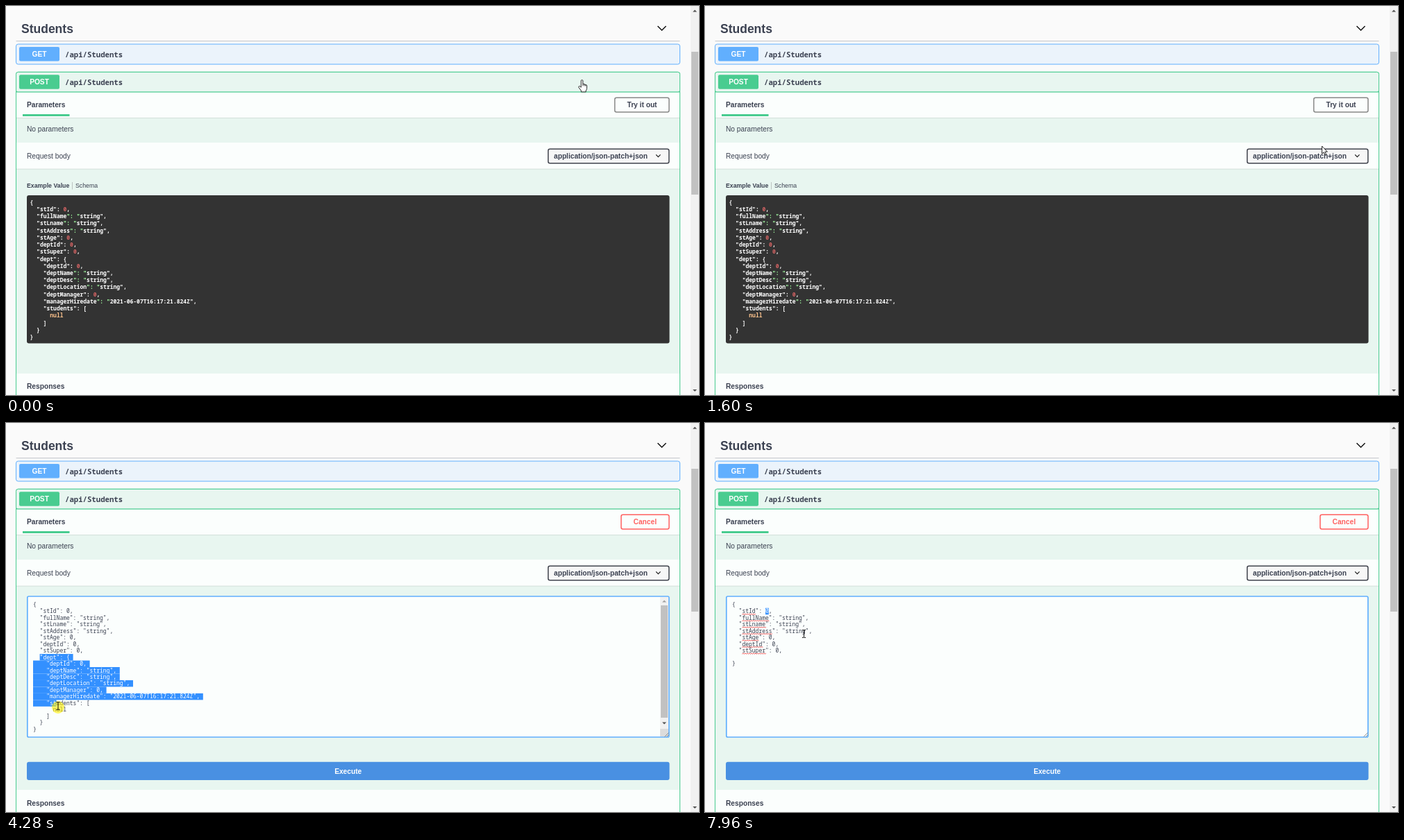
Recreate the animation shown at these times as an HTML page. Size 998 by 561 pixels, loop 8 s.

```html
<!DOCTYPE html>
<html lang="en">
<head>
<meta charset="utf-8">
<title>API docs walkthrough</title>
<style>
  html, body { margin: 0; width: 100%; height: 100%; overflow: hidden; background: #fafafa; }
  svg { display: block; width: 100vw; height: 100vh; }
  text { font-family: "Liberation Sans", Arial, sans-serif; font-size: 10.2px; fill: #3b4151; white-space: pre; }
  .b { font-weight: 700; }
  .mono { font-family: "Noto Sans Mono", "DejaVu Sans Mono", monospace; font-size: 8px; }
  .path { font-size: 10.67px; font-weight: 700; }
  .code { font-weight: 700; fill: #fff; }
  .area { font-weight: 500; }
</style>
</head>
<body>
<svg id="stage" viewBox="0 0 998 561" preserveAspectRatio="none"></svg>
<script>
const LOOP = 8000, ROW = 9.47, COL = 4.8;
const T = { collapse: 80, expand: 1600, edit: 2320, focus: 3440, release: 4900, remove: 5800, pick: 6920, pickEnd: 7240, spell: 7480 };
const INK = '#3b4151', BLUE = '#61affe', GREEN = '#49cc90', TINT = '#e8f6f0', PALE = '#fbfefd';

const rect = (x, y, w, h, fill, extra = '') =>
  `<rect x="${x}" y="${y}" width="${w}" height="${h}" fill="${fill}" ${extra}/>`;
const text = (x, y, s, cls = '', extra = '') => `<text x="${x}" y="${y}" class="${cls}" ${extra}>${s}</text>`;
const line = (d, color, w = 1, extra = '') => `<path d="${d}" fill="none" stroke="${color}" stroke-width="${w}" ${extra}/>`;
const group = (id, body) => `<g id="${id}">${body}</g>`;
const chevron = (x, y, r, w, color = '#111') => line(`M${x - r} ${y - r / 2}l${r} ${r}l${r} ${-r}`, color, w);
const triangle = (x, y, dir, color) => `<path d="M${x - 3} ${y + 1.5 * dir}h6l-3 ${-3 * dir}z" fill="${color}"/>`;
const size = n => `style="font-size:${n}px"`;

const body = [
  '{', '  "stId": 0,', '  "fullName": "string",', '  "stLname": "string",', '  "stAddress": "string",',
  '  "stAge": 0,', '  "deptId": 0,', '  "stSuper": 0,', '  "dept": {', '    "deptId": 0,',
  '    "deptName": "string",', '    "deptDesc": "string",', '    "deptLocation": "string",',
  '    "deptManager": 0,', '    "managerHiredate": "2021-06-07T16:17:21.824Z",', '    "students": [',
  '      null', '    ]', '  }', '}'
];
const trimmed = [...body.slice(0, 8), '  ', '}'];

function operation(y, verb, path, color, tint) {
  const w = verb === 'DELETE' ? 62 : 58;
  return rect(14.5, y, 956, 29, tint, `stroke="${color}" rx="3"`) +
    rect(19, y + 4, w, 20.5, color, 'rx="2"') +
    text(19 + w / 2, y + 18, verb, 'b', 'text-anchor="middle" style="fill:#fff"') +
    text(w + 27, y + 18.5, path, 'mono path');
}
const tagHeader = y => text(22, y + 6, 'Students', 'b', size(17.5)) +
  chevron(944.5, y - .8, 6, 1.5) + line(`M14.5 ${y + 17.8}H970.5`, '#c3c5ca');

function pageScrollbar(y, h, endColor) {
  return rect(986, 0, 12, 561, '#f1f1f1') + rect(987, y, 10, h, '#c1c1c1') +
    triangle(992, 7, 1, '#505050') + triangle(992, 554.5, -1, endColor);
}

function collapsedPage() {
  const pill = (x, w, s, color) => rect(x, 36, w, 14.5, color, 'rx="7.2"') +
    text(x + w / 2, 46.9, s, 'b', 'text-anchor="middle" style="fill:#fff"');
  const model = (y, s, x) => rect(30, y, 925.5, 42, '#ededed', 'rx="3"') +
    text(44.5, y + 24.5, s, 'b', size(11.7)) + line(`M${x} ${y + 18.5}l3.5 3.3l-3.5 3.3`, '#111', 1.5);
  return text(14.5, 60, 'API_Core', 'b', size(26)) +
    pill(137, 22, 'v1', '#7d8492') + pill(163, 34.5, 'OAS3', '#89bf04') +
    text(14.5, 76.5, '/swagger/v1/swagger.json', '', 'style="font-size:8.75px;fill:#4990e2"') +
    tagHeader(134.2) +
    operation(156.5, 'GET', '/api/Students', BLUE, '#ebf3fb') +
    operation(196.7, 'POST', '/api/Students', GREEN, TINT) +
    operation(237, 'GET', '/api/Students/{StId}', BLUE, '#ebf3fb') +
    operation(277.2, 'PUT', '/api/Students/{StId}', '#fca130', '#fbf1e6') +
    operation(317.4, 'DELETE', '/api/Students/{StId}', '#f93e3e', '#fbe7e7') +
    rect(14.5, 379.5, 956, 159, 'none', 'stroke="#c3c5ca" rx="3"') +
    text(23, 398.3, 'Schemas', 'b', 'style="font-size:11.7px;fill:#5a5e68"') +
    chevron(948, 394.5, 6, 1.5) + line('M14.5 409.5H970.5', '#c3c5ca') +
    model(424.8, 'Department', 124.5) + model(481.5, 'Student', 103.5) +
    pageScrollbar(51.5, 497, '#a0a0a0') +
    rect(167, 204, 1, 15, INK, 'id="pathCaret"') + rect(62, 205, 1, 12, '#fff', 'id="verbCaret"');
}

function colored(s) {
  return s.replace(/("[^"]*")(?!:)|\b0\b(?=,)|null/g, (m, str) => {
    const color = str ? '#a2fca2' : m === 'null' ? '#fcc28c' : '#d36363';
    return m.startsWith('"') && !str ? m : `<tspan fill="${color}">${m}</tspan>`;
  });
}

function expandedPage() {
  const shade = y => rect(15, y, 955, 1, '#000', 'opacity=".09"');
  const example = text(30, 262, 'Example Value', 'b', size(8.75)) + line('M95.5 254V264.5', '#bbc3c1') +
    text(100, 262, 'Schema', '', size(8.75)) + rect(30, 273, 925.5, 213.5, '#333', 'rx="3"') +
    body.map((s, i) => text(34.5, 285.8 + i * 10.22, colored(s), 'mono code')).join('') +
    rect(876.7, 132.2, 78.2, 20.8, 'none', 'stroke="#888" stroke-width="1.5" rx="2.5"') +
    text(916, 146, 'Try it out', 'b', 'text-anchor="middle"') +
    rect(15, 530, 955, 31, PALE) + text(30, 552.2, 'Responses', 'b');
  const edit = rect(885.9, 132.2, 69, 20.8, 'none', 'id="cancelBox" stroke-width="1.5" rx="2.5"') +
    text(920.3, 146, 'Cancel', 'b', 'id="cancelText" text-anchor="middle"') + group('editor', '') +
    rect(30, 488.7, 925.5, 26.3, '#4990e2', 'rx="3"') +
    text(492.7, 505.6, 'Execute', 'b', 'text-anchor="middle" style="fill:#fff"') +
    rect(15, 529, 955, 32, PALE) + text(30, 551.6, 'Responses', 'b');
  return tagHeader(32.8) + operation(55, 'GET', '/api/Students', BLUE, '#ebf3fb') +
    rect(14.5, 95.3, 956, 480, TINT, `stroke="${GREEN}" rx="3"`) +
    operation(95.3, 'POST', '/api/Students', GREEN, TINT) +
    rect(15, 124.3, 955, 36.7, PALE) + rect(15, 123.5, 955, 1, GREEN) + shade(161) +
    text(30, 146, 'Parameters', 'b') + rect(24, 156, 67.5, 3, GREEN) +
    text(30, 181.3, 'No parameters') +
    rect(15, 197, 955, 37.7, PALE) + shade(234.7) + text(30, 219.8, 'Request body') +
    rect(780.8, 206.2, 174, 20.6, '#f7f7f7', 'stroke="#41444e" stroke-width="1.5" rx="2.5"') +
    text(789, 220, 'application/json-patch+json', 'b') + chevron(939.3, 216, 3.2, 1.3, '#222') +
    group('example', example) + group('edit', edit) +
    line('M14.5 530V561M970.5 530V561', GREEN) + pageScrollbar(66, 206, '#505050');
}

const cursors =
  group('hand', `<path d="M-1.3 8V.9Q-1.2-.4 0-.4T1.3.9V5.5Q2.6 4.8 3.4 6Q4.6 5.4 5.2 6.7Q7 6.3 7 8.2V11.5Q7 13.6 5.6 15V16.9H-1.2V15L-4.6 10.6Q-5.3 9.4-4.3 8.7Q-3.2 8.2-1.3 10.3Z" fill="#fff" stroke="#111" stroke-width=".9"/>` +
    line('M1.3 5.5V8.3M3.4 6V8.4M5.2 6.7V8.6', '#111', .8)) +
  group('arrow', '<path d="M0 0V11.2L2.6 8.8L4.4 13L6.2 12.2L4.4 8.2H7.8Z" fill="#fff" stroke="#111" stroke-width=".9"/>') +
  group('beam', line('M-2.5-5.5H-.7L0-5L.7-5.5H2.5M0-5V5M-2.5 5.5H-.7L0 5L.7 5.5H2.5', '#111'));

const stage = document.getElementById('stage');
stage.innerHTML = rect(0, 0, 998, 561, '#fafafa') +
  group('collapsed', collapsedPage()) + group('expanded', expandedPage()) +
  '<circle id="press" r="9" fill="#ffee00" opacity=".6"/>' + group('cursor', cursors);
const $ = id => document.getElementById(id);
const show = (id, on) => $(id).setAttribute('visibility', on ? 'inherit' : 'hidden');

// Pointer hotspot: time, x, y
const route = [
  [0, 829.5, 107], [520, 829.5, 107], [1360, 862, 202], [1520, 884.5, 202], [1600, 888.5, 202],
  [2160, 897, 148], [2320, 892, 150], [2400, 885, 157], [2720, 560, 245], [2960, 160, 332],
  [3120, 55, 350], [3240, 54, 343], [3400, 53, 341], [4280, 75, 408], [4720, 78, 431],
  [6040, 78, 431], [6480, 115, 335], [6840, 91, 270], [7440, 91, 270], [7960, 142.5, 304]
];
function pointer(time) {
  const t = Math.floor(time / 40) * 40;
  const i = route.findIndex(p => p[0] > t);
  if (i < 0) return route[route.length - 1].slice(1);
  const [a, b] = [route[i - 1], route[i]];
  const k = (t - a[0]) / (b[0] - a[0]);
  return [a[1] + (b[1] - a[1]) * k, a[2] + (b[2] - a[2]) * k];
}

const blend = (from, to, k) => `rgb(${from.map((v, i) => Math.round(v + (to[i] - v) * k))})`;

// Selection as [row, col, endRow, endCol]
function selection(t, x, y) {
  if (t >= T.pick + 80) return [1, 10, 1, 11];
  if (t < T.focus + 40 || t >= T.remove) return null;
  const row = Math.max(8, Math.min(18, Math.floor((y - 257.3) / ROW)));
  const col = Math.max(0, Math.min(body[row].length, Math.floor((x - 39) / COL)));
  return [8, 2, row, row === 8 ? Math.max(2, col) : col];
}

function squiggle(x, y, w) {
  let d = `M${x} ${y}`;
  for (let i = 0; i < w / 1.5; i++) d += `l1.5 ${i % 2 ? 1 : -1}`;
  return line(d, '#e33', .8);
}

function editor(focused, removed, sel, caret, spell) {
  const lines = removed ? trimmed : body;
  const x0 = focused ? 39 : 37.5, base = focused ? 264.8 : 263.8;
  let out = focused
    ? rect(30.8, 250, 924, 203, PALE, `stroke="${BLUE}" stroke-width="1.7" rx="2"`)
    : rect(30, 249, 925.5, 204.7, PALE, 'rx="2"');
  lines.forEach((s, r) => {
    const y = base + r * ROW;
    const piece = (a, b, color) => a < b
      ? text(x0 + a * COL, y, s.slice(a, b), 'mono area', `style="fill:${color}"`) : '';
    if (sel && r >= sel[0] && r <= sel[2]) {
      const a = r === sel[0] ? sel[1] : 0, last = r === sel[2], b = last ? sel[3] : s.length;
      out += rect(x0 + a * COL, y - 7.5, (b - a + (last ? 0 : 1)) * COL, ROW, '#3390ff') +
        piece(0, a, INK) + piece(a, b, '#fff') + piece(b, s.length, INK);
    } else out += piece(0, s.length, INK);
    const word = spell && s.match(/"(\w+)":/);
    if (word) out += squiggle(x0 + 3 * COL, y + 2, word[1].length * COL);
  });
  if (caret) out += rect(48, 333, 1, 10, '#111');
  if (focused && !removed) {
    out += rect(942, 251, 12, 190, '#f1f1f1') + rect(943, 263, 10, 162, '#c1c1c1') +
      triangle(948, 257, 1, '#a0a0a0') + triangle(948, 433, -1, '#505050') + rect(942, 441, 12, 11, '#dcdcdc');
  }
  return out + line('M948.5 452.5l6-6M951.5 452.5l3-3', '#777', .8);
}

let lastKey = '';
function render(t) {
  const collapsed = t >= T.collapse && t < T.expand, editing = t >= T.edit;
  const [x, y] = pointer(t);
  show('collapsed', collapsed);
  show('expanded', !collapsed);
  show('pathCaret', collapsed && (t < 360 || t >= 860 && t < 1360));
  show('verbCaret', collapsed && t >= 1360);
  show('example', !collapsed && !editing);
  show('edit', !collapsed && editing);

  if (editing) {
    const k = Math.max(0, Math.min(1, (t - 2340) / 300));
    $('cancelBox').setAttribute('stroke', blend([122, 48, 64], [255, 96, 96], k));
    $('cancelBox').style.filter = t < 2520 ? 'drop-shadow(0 0 2px rgba(0,0,0,.3))' : 'none';
    $('cancelText').style.fill = blend([59, 65, 81], [255, 96, 96], k);
    const removed = t >= T.remove;
    const caret = removed && t < T.pick && (t < 6300 || t >= 6800);
    const state = [t >= T.focus, removed, selection(t, x, y), caret, t >= T.spell];
    const key = JSON.stringify(state);
    if (key !== lastKey) $('editor').innerHTML = editor(...state);
    lastKey = key;
  }

  const pressed = t >= 3240 && t < T.release || t >= T.pick && t < T.pickEnd;
  show('press', pressed);
  $('press').setAttribute('cx', x);
  $('press').setAttribute('cy', y + 2);

  const kind = t < 1440 || t >= 2080 && t < 2480 ? 'hand' : t < T.edit || y < 249 ? 'arrow' : 'beam';
  ['hand', 'arrow', 'beam'].forEach(id => show(id, id === kind));
  $('cursor').setAttribute('transform', `translate(${x} ${y})`);
}

const start = performance.now();
function tick() {
  render((performance.now() - start) % LOOP);
  requestAnimationFrame(tick);
}
tick();
</script>
</body>
</html>
```
